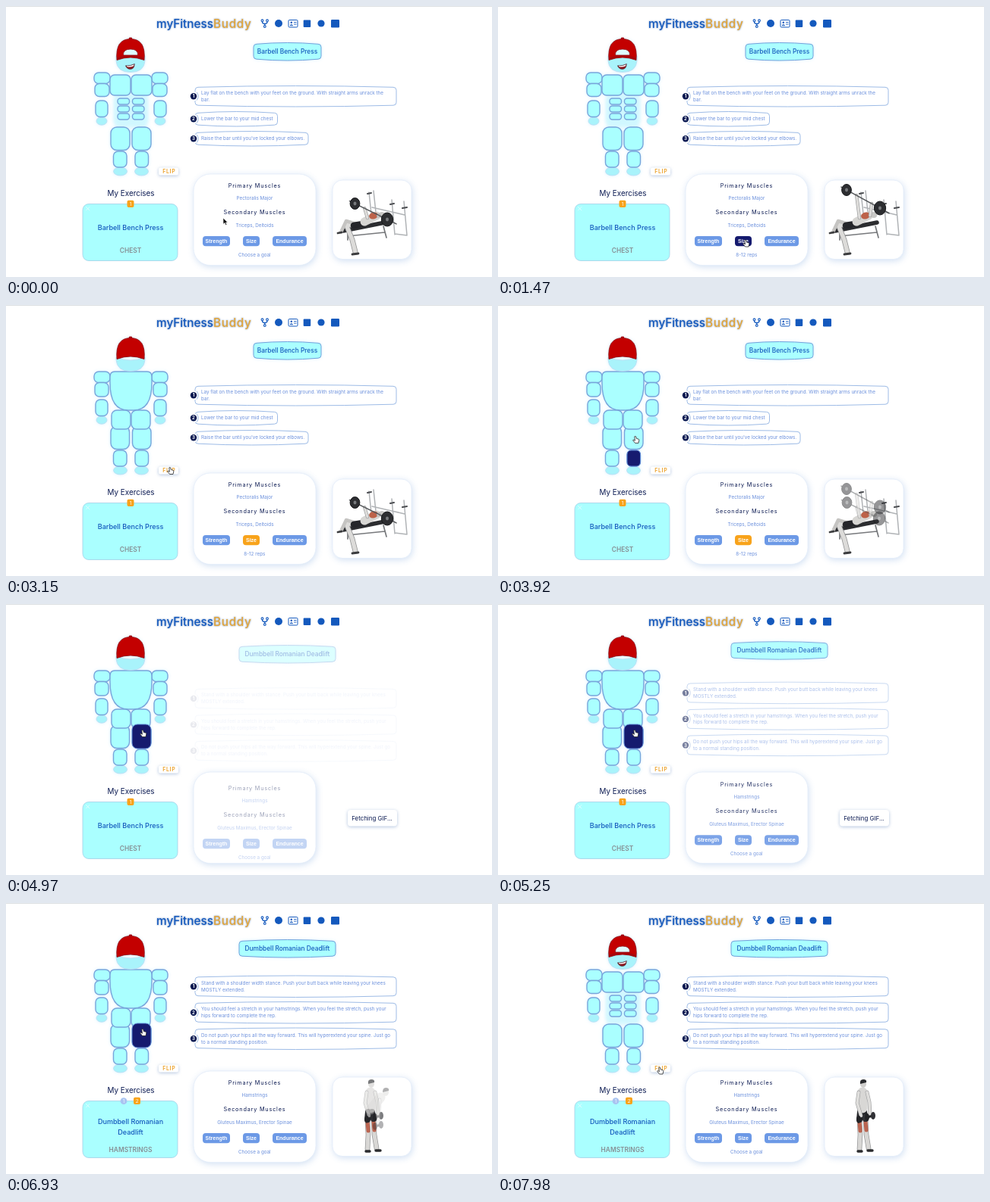
An HTML page for the animation above (8 s loop, 640 by 358 pixels).

```html
<!DOCTYPE html>
<html lang="en">
<head>
<meta charset="utf-8">
<title>myFitnessBuddy</title>
<style>
html, body { margin: 0; width: 100%; height: 100%; overflow: hidden; background: #fff; }
svg { display: block; width: 100vw; height: 100vh; font-family: Inter, "Open Sans", sans-serif; }
.logo { font-size: 15.3px; font-weight: 500; filter: drop-shadow(0 0 1px #6f8fc0); }
.mid { text-anchor: middle; }
.heading { font-size: 7.3px; letter-spacing: .8px; fill: #0b1a52; text-anchor: middle; }
.small { font-size: 6.3px; fill: #6a8fdc; }
.button { font: bold 7px "Liberation Sans", sans-serif; fill: #fff; text-anchor: middle; }
.part { fill: #aff; stroke: #78a5db; stroke-width: 1.4; }
.pale { fill: #a9f3fb; stroke: #bcdcf3; stroke-width: .8; }
.glow { filter: drop-shadow(0 0 2px #8fdcff55); }
.card { fill: #fff; stroke: #e4edf9; stroke-width: .8; filter: drop-shadow(1px 2px 4px #9fbde677); }
.raised { fill: #fff; filter: drop-shadow(0 1px 2px #7e9cc899); }
.line { fill: none; stroke-linecap: round; stroke-linejoin: round; }
</style>
</head>
<body>
<svg id="stage" viewBox="0 0 640 358" preserveAspectRatio="none"></svg>
<script>
const NAVY = '#151a6e', ORANGE = '#f8a31b', BLUE = '#1459bd', BUTTON = '#6c99e6';

const text = (x, y, content, attrs = '') => `<text x="${x}" y="${y}" ${attrs}>${content}</text>`;
const rect = (x, y, w, h, r, attrs = '') => `<rect x="${x}" y="${y}" width="${w}" height="${h}" rx="${r}" ${attrs}/>`;
const oval = (x, y, rx, ry, attrs = '') => `<ellipse cx="${x}" cy="${y}" rx="${rx}" ry="${ry}" ${attrs}/>`;
const line = (d, color, width) => `<path class="line" d="${d}" stroke="${color}" stroke-width="${width}"/>`;
const group = (id, content, attrs = '') => `<g id="${id}" ${attrs}>${content}</g>`;

// Rounded box whose top and bottom edges bulge outwards.
function bowedBox(x, y, w, h, attrs) {
  const r = 4, bow = 1.8, right = x + w, bottom = y + h;
  return `<path d="M${x} ${y + bow + r}Q${x} ${y + bow} ${x + r} ${y + bow}Q${x + w / 2} ${y - bow} ${right - r} ${y + bow}
    Q${right} ${y + bow} ${right} ${y + bow + r}V${bottom - bow - r}Q${right} ${bottom - bow} ${right - r} ${bottom - bow}
    Q${x + w / 2} ${bottom + bow} ${x + r} ${bottom - bow}Q${x} ${bottom - bow} ${x} ${bottom - bow - r}Z" ${attrs}/>`;
}

// Each limb part is mirrored around the body axis at x = 164.5.
const pair = (x, y, w, h, r) => rect(x, y, w, h, r, 'class="part"') + rect(329 - x - w, y, w, h, r, 'class="part"');
const ovalPair = (x, y, rx, ry) => oval(x, y, rx, ry, 'class="pale"') + oval(329 - x, y, rx, ry, 'class="pale"');

function header() {
  const icon = BLUE;
  return rect(0, 0, 640, 1, 0, 'fill="#dcdfe2"') +
    text(273, 28.5, 'myFitness', `class="logo" text-anchor="end" fill="${BLUE}"`) +
    text(273, 28.5, 'Buddy', 'class="logo" fill="#e5a637" letter-spacing=".7"') +
    line('M337.5 20V21Q337.5 23.5 340.8 23.5Q344 23.5 344 21V20M340.8 23.5V26', icon, 1.3) +
    [[337.5, 19.3], [344, 19.3], [340.8, 27]].map(([x, y]) =>
      `<circle cx="${x}" cy="${y}" r="1.4" fill="#fff" stroke="${icon}" stroke-width="1.1"/>`).join('') +
    `<circle cx="359" cy="23" r="5" fill="${icon}"/>` +
    rect(372, 18.5, 12, 9.5, 1.2, `fill="none" stroke="${icon}"`) +
    `<circle cx="375.8" cy="21.7" r="1.3" fill="${icon}"/>` +
    line('M374.2 25.4Q375.8 23 377.4 25.4ZM379.5 21.5H382M379.5 24H382', icon, .9) +
    rect(391.7, 18.5, 9.5, 9.5, 1, `fill="${icon}"`) +
    `<circle cx="415" cy="23" r="4.6" fill="${icon}"/>` +
    rect(428, 18, 11, 10.5, 1.2, `fill="${icon}"`);
}

function body() {
  const arms = ovalPair(126, 152, 7, 5.2) + pair(116, 88, 21, 14.5, 6) + pair(118, 125, 16, 21.5, 6);
  const feet = ovalPair(150.5, 218.5, 9, 5.5);
  const face = '<path d="M145 69Q164 77 183 69V72Q182 87.5 164 87.5Q146 87.5 145 72Z" class="pale"/>';
  const dome = '<path d="M146 71.5Q143.5 43.5 164 43.5Q184.5 43.5 182 71.5Q173 68 164 68Q155 68 146 71.5Z" fill="#c30000" stroke="#8c0b12" stroke-width=".8"/>' +
    oval(164, 43, 2.4, 1.4, 'fill="#a50910"');
  const shins = pair(141.5, 192, 17.5, 21, 6);
  const front = group('front', rect(142, 116, 45, 44, 8, 'fill="#c8f8ff" opacity=".7" style="filter:blur(2px)"') +
    arms + feet + pair(117, 102.5, 19, 17, 6) + pair(137, 91, 27, 27, 6) +
    [122, 132, 142].map(y => pair(147, y, 15.5, 8, 3.5)).join('') +
    pair(138, 160, 25, 30.5, 8) + shins +
    '<path d="M145 66H183V72Q182 87.5 164 87.5Q146 87.5 145 72Z" class="pale"/>' + dome +
    '<path d="M154.5 65Q154 57 164 57Q174 57 173.5 65Z" fill="#dffaff" stroke="#8c0b12" stroke-width=".8"/>' +
    line('M147 69.5Q155 66 164 66Q173 66 181 69.5', '#a3080e', 2) +
    '<path d="M157.5 78.8Q164 79.5 169.3 76.5Q169 83.5 163.5 83.5Q159 83.3 157.5 78.8Z" fill="#8c1820" stroke="#33222c" stroke-width=".6"/>' +
    '<path d="M158.8 79Q164 79.7 168.6 77.2L168 79.3Q164 81 159.6 80.3Z" fill="#fff"/>', 'class="glow"');
  const back = group('back', arms + feet + pair(117, 102.5, 18, 18.5, 6) +
    '<path class="part" d="M143 88H186Q192 88 192 95V103Q192 139 168 139H161Q137 139 137 103V95Q137 88 143 88Z"/>' +
    pair(138, 160, 24.5, 30.5, 8) + pair(139, 139, 25, 25, 7) + shins +
    rect(170, 192, 17.5, 21, 5, `id="shin" fill="${NAVY}" stroke="#5f88d4"`) +
    rect(166, 159, 25, 32, 7, `id="thigh" fill="${NAVY}" stroke="#5f88d4"`) +
    face + dome, 'class="glow"');
  return front + back + rect(201, 213.5, 26, 10, 2.5, 'class="raised"') +
    text(214.8, 221.2, 'FLIP', 'class="mid" font-size="7" font-weight="600" letter-spacing=".7" fill="#eb9f25"');
}

function badge(x, n) {
  return rect(x - 4.5, 256.7, 9, 9.3, 2, `fill="${ORANGE}"`) + text(x, 263.6, n, 'class="mid" font-size="6" fill="#fff"');
}

function savedCard() {
  const name = (y, s) => text(164, y, s, `class="mid" font-size="9.05" font-weight="500" fill="${BLUE}"`);
  const muscle = (y, s) => text(164, y, s, 'class="mid" font-size="8.4" font-weight="600" fill="#868f94"');
  return text(164.5, 250.5, 'My Exercises', 'class="mid" font-size="9.9" fill="#0b1a52"') +
    rect(101, 261.5, 125, 75, 8, 'fill="#aff" stroke="#a3cfe6" stroke-width=".8"') +
    line('M105.5 265.5L110 270M110 265.5L105.5 270', '#dffcff', 1) +
    group('savedOne', name(295.5, 'Barbell Bench Press') + muscle(325.7, 'CHEST') + badge(164, 1)) +
    group('savedTwo', name(291.7, 'Dumbbell Romanian') + name(305.7, 'Deadlift') + muscle(329.2, 'HAMSTRINGS') +
      '<circle cx="155" cy="261.7" r="4.4" fill="#a9c4f1"/>' +
      text(155, 263.8, 1, 'class="mid" font-size="5.5" fill="#fff"') + badge(172.5, 2));
}

function title(x, w, name) {
  return bowedBox(x, 48.5, w, 23.5, 'fill="#aff" stroke="#71a0da" class="glow"') +
    text(x + w / 2, 63.3, name, `class="mid" font-size="8.3" font-weight="500" fill="${BLUE}"`);
}

function step(n, y, w, h, lines) {
  const middle = y + h / 2;
  return bowedBox(249, y, w, h, 'fill="#fff" stroke="#9dbbe6" stroke-width="1"') +
    `<circle cx="247.5" cy="${middle}" r="6" fill="#fff"/>` +
    line(`M251.5 ${middle - 5}Q255 ${middle} 251.5 ${middle + 5}`, '#8fb0e0', .9) +
    `<circle cx="247" cy="${middle}" r="4.2" fill="#0b1a52"/>` +
    text(247, middle + 2.1, n, 'class="mid" font-size="6" font-weight="700" fill="#fff"') +
    lines.map((s, i) => text(257, middle + 2 + (i - (lines.length - 1) / 2) * 8.8, s, 'class="small"')).join('');
}

function muscles(primary, secondary) {
  return text(327.5, 239.5, 'Primary Muscles', 'class="heading"') + text(327.5, 255.7, primary, 'class="small mid"') +
    text(327.5, 275.2, 'Secondary Muscles', 'class="heading"') + text(327.5, 291.6, secondary, 'class="small mid"');
}

function goalButton(id, x, w, label) {
  return rect(x, 304, w, 13.3, 4, `id="${id}" fill="${BUTTON}"`) + text(x + w / 2, 313.2, label, 'class="button"');
}

function details() {
  return group('benchPage', title(326, 89, 'Barbell Bench Press') +
      step(1, 105.5, 265, 27.5, ['Lay flat on the bench with your feet on the ground. With straight arms unrack the', 'bar.']) +
      step(2, 139.5, 108.5, 19.5, ['Lower the bar to your mid chest']) +
      step(3, 165.5, 149, 19.5, ['Raise the bar until you\'ve locked your elbows.'])) +
    group('liftTitle', title(307, 127, 'Dumbbell Romanian Deadlift')) +
    group('liftSteps',
      step(1, 96, 265, 28.5, ['Stand with a shoulder width stance. Push your butt back while leaving your knees', 'MOSTLY extended.']) +
      step(2, 130.5, 265, 28.5, ['You should feel a stretch in your hamstrings. When you feel the stretch, push your', 'hips forward to complete the rep.']) +
      step(3, 165, 265, 28.5, ['Do not push your hips all the way forward. This will hyperextend your spine. Just go', 'to a normal standing position.'])) +
    rect(247, 222, 161, 120.5, 22, 'class="card"') +
    group('info', group('benchMuscles', muscles('Pectoralis Major', 'Triceps, Deltoids')) +
      group('liftMuscles', muscles('Hamstrings', 'Gluteus Maximus, Erector Spinae')) +
      goalButton('strength', 259, 36, 'Strength') + goalButton('size', 312, 22, 'Size') + goalButton('endurance', 351, 45, 'Endurance') +
      group('noGoal', text(327.3, 330.6, 'Choose a goal', 'class="small mid"')) +
      group('reps', text(327.3, 330.6, '8-12 reps', 'class="small mid"')));
}

function barbell(x1, y1, x2, y2) {
  const dx = x2 - x1, dy = y2 - y1;
  const plate = (x, y, r) => oval(x, y, r * .85, r, 'fill="#2d2e31" stroke="#17181a"') + oval(x, y, 2, 2.4, 'fill="#77797c"');
  const arms = `M476 280L${x1 + dx * .3} ${y1 + dy * .3}M490 277L${x1 + dx * .75} ${y1 + dy * .75}`;
  return line(arms, '#9b9c9d', 4.4) + line(arms, '#dedddb', 3) +
    line(`M${x1 - 7} ${y1 - dy * .16}L${x2 + 12} ${y2 + dy * .28}`, '#55585b', 1.5) +
    plate(x1, y1, 7.5) + plate(x2, y2, 9);
}

function benchPicture() {
  return line('M478 246L482 284M484 244L488 282M508 256L512 302M524 258L528 303M482 266L525 276M512 301L528 303', '#b0b3b6', 1.5) +
    line('M476 248L481 247M506 262L511 261M522 267L528 266', '#4a4c50', 2) +
    line('M450 299V309M497 291L501 306M450 304L499 299', '#77797c', 1.7) +
    line('M444 297L499 286', '#2c2d30', 5.5) +
    line('M467 289L448 289L456 309L460 325', '#8f9091', 7) +
    line('M467 289L448 289L456 309L460 325', '#dcdbd9', 5.4) +
    line('M461 288L448 284L441 299', '#c5c4c2', 4.5) +
    line('M470 288L458 290', '#25262a', 8.5) +
    line('M472 285L488 277', '#d7d6d3', 11) +
    oval(484, 277, 6, 4.4, 'fill="#bd6249" transform="rotate(-18 484 277)"') +
    oval(495, 276, 4.2, 4, 'fill="#c9c8c6"') +
    line('M456 328L464 327M437 300L442 299', '#3b3c3e', 2.8) +
    group('barDown', barbell(459.5, 261, 502, 282)) + group('barUp', barbell(459, 243, 503, 267));
}

function dumbbell(x, y) {
  return line(`M${x - 4} ${y + 1}L${x + 4} ${y - 1}`, '#222326', 3) +
    oval(x - 4, y + 1, 3, 5, 'fill="#222326"') + oval(x + 4, y - 1, 3, 5, 'fill="#303135"');
}

function liftPicture() {
  const legs = line('M476 286L477 306L476 325', '#929394', 6.6) + line('M484 286L485 306L488 324', '#929394', 6.6) +
    line('M476 286L477 306L476 325M484 286L485 306L488 324', '#d8d7d5', 5.2) +
    line('M476 289L477 301M484 289L485 300', '#bb6551', 5) +
    line('M474 328L479 328M487 327L493 327', '#2b2c2f', 3.4) +
    line('M477 276L476 286M482 276L484 285', '#26272b', 8);
  const stand = line('M480 250L480 271', '#d8d7d5', 13) + line('M475 250L473 264L478 281M486 250L489 263L490 280', '#9b9c9d', 4.8) +
    line('M475 250L473 264L478 281M486 250L489 263L490 280', '#dfdedc', 3.6) +
    oval(481, 239, 4, 5, 'fill="#d0cfcd"') + '<path d="M477 239Q476 233 481 233Q486 233 485 237Z" fill="#2b2c2f"/>' +
    dumbbell(479, 285) + dumbbell(490, 282);
  const bend = line('M480 273L493 257', '#d8d7d5', 13) + line('M492 260L491 274L490 290', '#9b9c9d', 4.8) +
    line('M492 260L491 274L490 290', '#dfdedc', 3.6) + oval(500, 250, 4, 5, 'fill="#d0cfcd"') +
    '<path d="M496 250Q496 244 500 244Q505 244 504 248Z" fill="#2b2c2f"/>' + dumbbell(490, 294);
  return legs + group('stand', stand) + group('bend', bend);
}

function media() {
  return group('panel', rect(430, 230, 104, 104.5, 13, 'class="card"') +
      group('benchPicture', benchPicture()) + group('liftPicture', liftPicture())) +
    group('fetching', rect(450, 272, 65, 21.5, 4, 'class="raised"') +
      text(482, 285.8, 'Fetching GIF...', 'class="mid" font-size="7.9" fill="#0b1a52"'));
}

const cursor = group('arrow', '<path d="M0 0V8.3L2 6.5L3.4 9.5L4.8 8.8L3.5 6H6Z" fill="#111" stroke="#fff" stroke-width=".6"/>') +
  group('hand', '<path d="M-1.2 -3.6Q0 -4.6 .8 -3.4L1.3 -.9L4 -.3Q5 0 4.8 1.3L4 5H-.4L-3.3 1.4Q-3.2 .2 -1.9 .8L-.6 1.8Z" fill="#fff" stroke="#222" stroke-width=".8" stroke-linejoin="round"/>');

const stage = document.getElementById('stage');
stage.innerHTML = header() + body() + savedCard() + details() + media() + group('cursor', cursor);

const el = id => document.getElementById(id);
const show = (id, opacity, dy = 0) => {
  el(id).setAttribute('opacity', +opacity);
  el(id).setAttribute('transform', `translate(0 ${dy})`);
};
const ramp = (t, from, to) => Math.min(1, Math.max(0, (t - from) / (to - from)));
const pulse = (t, from, to, fade) => ramp(t, from, from + fade) * (1 - ramp(t, to, to + fade));

// Cursor stops: time, x, y.
const path = [
  [0, 286, 280], [450, 286, 280], [1100, 326, 313], [1850, 326, 313], [2550, 216, 218.5], [3250, 216, 218.5],
  [3650, 179, 203], [3750, 179, 201], [3900, 181, 177.5], [4200, 180, 170.5], [6950, 180, 170.5], [7500, 213, 221], [8000, 213, 221]
];

function cursorAt(t) {
  const i = path.findIndex((p, n) => n && t <= p[0]);
  const [t0, x0, y0] = path[i - 1], [t1, x1, y1] = path[i];
  const k = ramp(t, t0, t1), e = k * k * (3 - 2 * k);
  return [x0 + (x1 - x0) * e, y0 + (y1 - y0) * e];
}

function draw() {
  const t = performance.now() % 8000;
  const switchAt = 4740, lifted = t >= switchAt;
  const flipped = t >= 2720 && t < 7640;
  show('front', !flipped);
  show('back', flipped);
  show('shin', pulse(t, 3520, 3920, 120));
  show('thigh', pulse(t, 3950, 7040, 150));

  const titleIn = lifted ? ramp(t, switchAt, 5320) : 1, stepsIn = ramp(t, 4920, 5520);
  show('benchPage', !lifted);
  show('liftTitle', lifted ? titleIn : 0, 10 * (1 - titleIn));
  show('liftSteps', stepsIn, 16 * (1 - stepsIn));
  show('info', titleIn, 10 * (1 - titleIn));
  show('benchMuscles', !lifted);
  show('liftMuscles', lifted);

  const picked = t >= 1300 && !lifted, overSize = t >= 950 && t < 2000;
  show('reps', picked);
  show('noGoal', !picked);
  el('size').setAttribute('fill', overSize ? NAVY : picked ? ORANGE : BUTTON);

  show('savedOne', t < 5450);
  show('savedTwo', t >= 5450);
  show('fetching', lifted && t < 5600);
  show('panel', lifted ? ramp(t, 6000, 6250) : 1);
  show('benchPicture', !lifted);
  show('liftPicture', lifted);
  const up = pulse(t % 3000, 760, 2160, 320);
  show('barUp', up);
  show('barDown', 1 - up);
  const bent = pulse(t, 6850, 7400, 220);
  show('bend', bent);
  show('stand', 1 - bent);

  const [x, y] = cursorAt(t);
  const pointing = overSize || (t > 2430 && t < 3330) || (t > 3500 && t < 7080) || t > 7380;
  show('hand', pointing);
  show('arrow', !pointing);
  el('cursor').setAttribute('transform', `translate(${x} ${y})`);
  requestAnimationFrame(draw);
}
draw();
</script>
</body>
</html>
```
